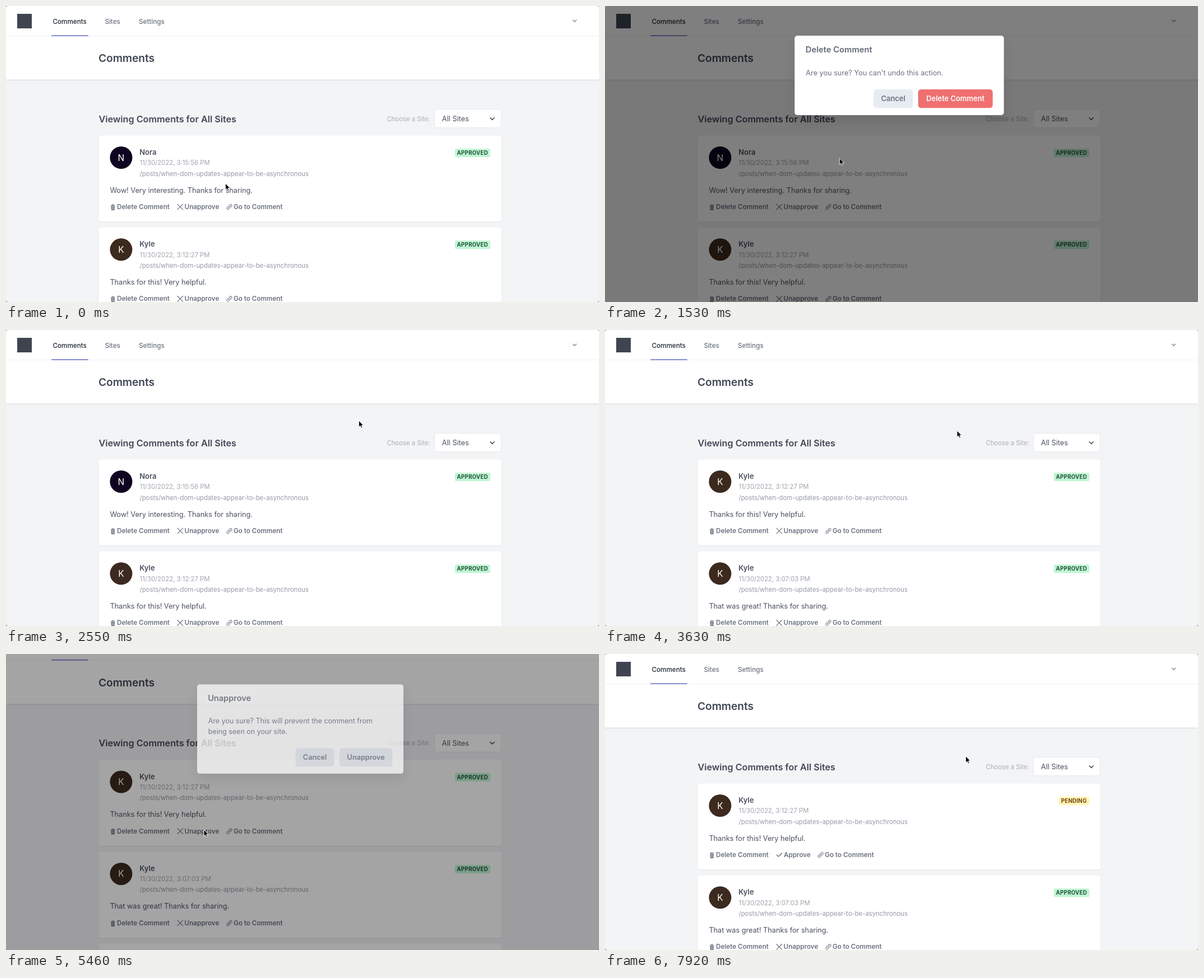
An HTML page for the animation above (8.1 s loop, 1058 by 529 pixels).

```html
<!DOCTYPE html>
<html lang="en">
<head>
<meta charset="utf-8">
<title>Comments</title>
<style>
  html, body { margin: 0; width: 100%; height: 100%; overflow: hidden; background: #777; }
  svg { display: block; width: 1058px; height: 529px; border-radius: 4px; font-family: Inter, "Open Sans", sans-serif; }
  .body { font-size: 12.8px; letter-spacing: -.004em; }
  .small { font-size: 11.33px; }
  .act { font-size: 11.67px; font-weight: 600; fill: #6b7280; }
  .badge { font-size: 9.7px; font-weight: 700; letter-spacing: .25px; }
  .btn { font-size: 12.9px; font-weight: 600; text-anchor: middle; }
  .line { fill: none; stroke: #6b7280; stroke-width: 1.2; stroke-linecap: round; stroke-linejoin: round; }
  .card { filter: drop-shadow(0 1px 1px rgba(0,0,0,.06)); }
  .panel { filter: drop-shadow(0 10px 10px rgba(0,0,0,.1)); }
</style>
</head>
<body>
<svg id="stage" viewBox="0 0 1058 529"></svg>
<script>
const LOOP = 8100, SCROLL = 42.4;
const PATH = '/posts/when-dom-updates-appear-to-be-asynchronous';

const text = (x, y, str, fill, attrs = '') => `<text x="${x}" y="${y}" fill="${fill}" ${attrs}>${str}</text>`;
const rect = (x, y, w, h, fill, attrs = '') => `<rect x="${x}" y="${y}" width="${w}" height="${h}" fill="${fill}" ${attrs}/>`;
const line = (d, attrs = '') => `<path class="line" d="${d}" ${attrs}/>`;

const trash = `<path fill="#6b7280" d="M187 124.2h2.2l.5-1.2h2l.5 1.2h2.3v1.2h-7.5zM187.4 126.2h6.7l-.5 7.3h-5.7z"/>
  <path stroke="#fff" stroke-width=".5" d="M189.4 127.5v4.7M190.8 127.5v4.7M192.2 127.5v4.7"/>`;
const link = x => `<g transform="translate(${x} 127.5) rotate(-45)">
  ${line('M-.8 -2H-3.6a2 2 0 0 0 0 4H-.8M.8 -2H3.6a2 2 0 0 1 0 4H.8M-2.2 0H2.2', 'style="stroke-width:1"')}</g>`;

function card(index, c) {
  const frame = rect(165.5, 0, 718.5, 153.5, '#fff', 'rx="4" class="card"');
  const open = `<g transform="translate(0 ${231.5 + index * 164.3})">${frame}`;
  if (!c) return open + '</g>';
  const badge = c.pending
    ? rect(809.5, 23.5, 54.5, 15, '#fef5b5', 'rx="2"') + text(813.8, 34.6, 'PENDING', '#744210', 'class="badge"')
    : rect(801, 23.5, 63, 15, '#c0f5d3', 'rx="2"') + text(804.6, 34.6, 'APPROVED', '#22543d', 'class="badge"');
  const toggle = c.pending
    ? line('M306.5 127.5l3 3 6 -6', 'style="stroke-width:1.5"') + text(319, 131.7, 'Approve', '', 'class="act"')
    : line('M306 122.7l9.6 9.6M315.6 122.7l-9.6 9.6') + text(318.6, 131.7, 'Unapprove', '', 'class="act"');
  const shift = c.pending ? -13.8 : 0;
  return open + badge + toggle + trash +
    `<circle cx="205.4" cy="39.5" r="20" fill="${c.color}"/>` +
    text(205.4, 45, c.name[0], '#fff', 'font-size="15.5" text-anchor="middle"') +
    text(238.2, 34.7, c.name, '#4a505d', 'font-size="13" font-weight="600"') +
    text(238.6, 52.8, `11/30/2022, ${c.time} PM`, '#a0a5af', 'class="small"') +
    text(238.6, 72, PATH, '#959aa5', 'class="small"') +
    text(185.4, 102, c.body, '#4b5260', 'class="body"') +
    text(198, 131.7, 'Delete Comment', '', 'class="act"') +
    link(398.5 + shift) + text(406 + shift, 131.7, 'Go to Comment', '', 'class="act"') + '</g>';
}

const first = { name: 'Nora', color: '#0f0520', time: '3:15:56', body: 'Wow! Very interesting. Thanks for sharing.' };
const second = { name: 'Kyle', color: '#3c2a1e', time: '3:12:27', body: 'Thanks for this! Very helpful.' };
const third = { name: 'Kyle', color: '#3c2a1e', time: '3:07:03', body: 'That was great! Thanks for sharing.' };
const lists = [[first, second], [second, third], [{ ...second, pending: true }, third]];

const header =
  rect(0, 0, 1058, 131.5, '#fff', 'style="filter:drop-shadow(0 1px 1px rgba(0,0,0,.12))"') +
  rect(0, 53, 1058, 1, '#f1f2f4') +
  rect(20, 14, 26, 26, '#3f4450') +
  rect(81, 52.2, 65.7, 1.8, '#7d82cf') +
  text(83.5, 31.8, 'Comments', '#1f2633', 'font-size="11.67" font-weight="500"') +
  text(176.4, 31.8, 'Sites', '#6b7280', 'font-size="11.67" font-weight="500"') +
  text(237, 31.8, 'Settings', '#6b7280', 'font-size="11.67" font-weight="500"') +
  line('M1011.6 25.2l3 3 3 -3') +
  text(165, 100, 'Comments', '#414856', 'font-size="19.2" font-weight="600" letter-spacing="-.005em"') +
  text(165.4, 207.5, 'Viewing Comments for All Sites', '#414856', 'font-size="16.2" font-weight="600"') +
  text(679.4, 205.7, 'Choose a Site:', '#a9aeb8', 'class="small"') +
  rect(764.5, 184.8, 118.8, 32.6, '#fff', 'rx="4" stroke="#e6e8ec"') +
  text(777.8, 206, 'All Sites', '#4b5260', 'font-size="12.8"') +
  line('M864 199.8l3.6 3.6 3.6 -3.6', 'style="stroke:#414856;stroke-width:1.5"');

function modal(id, title, lines, label, width, fill, ink) {
  const extra = (lines.length - 1) * 20, left = 691.7 - width, top = 149 + extra;
  const cancel = left - 79.5;
  return `<g id="${id}">` +
    rect(338.3, 53, 373.4, 142 + extra, '#fff', 'rx="5" class="panel"') +
    text(357.8, 83.2, title, '#626975', 'font-size="14.75" font-weight="600"') +
    lines.map((s, i) => text(358.3, 123.5 + i * 20, s, '#6b7280', 'class="body"')).join('') +
    rect(cancel, top, 70, 33.3, '#e7ecf3', 'rx="5"') +
    text(cancel + 35, top + 21.3, 'Cancel', '#6b7280', 'class="btn"') +
    rect(left, top, width, 33.3, fill, 'rx="5" class="ok"') +
    text(left + width / 2, top + 21.3, label, ink, 'class="btn"') + '</g>';
}

const stage = document.getElementById('stage');
stage.innerHTML = rect(0, 0, 1058, 529, '#f3f4f6') +
  '<g id="page">' + header +
  lists.map(list => `<g class="list">${[...list, null].map((c, i) => card(i, c)).join('')}</g>`).join('') +
  '</g>' +
  rect(0, 0, 1058, 529, '#000', 'id="shade"') +
  modal('remove', 'Delete Comment', ["Are you sure? You can't undo this action."], 'Delete Comment', 133, '#f07070', '#fff') +
  modal('hide', 'Unapprove', ['Are you sure? This will prevent the comment from', 'being seen on your site.'],
    'Unapprove', 95.7, '#e7ecf3', '#6b7280') +
  `<g id="cursor" stroke-linejoin="round">
    <path id="arrow" fill="#000" stroke="#fff" stroke-width=".9"
      d="M0 0V11.6L2.7 9.2L4.4 13.2L6.4 12.3L4.7 8.5H8.2Z"/>
    <path id="hand" fill="#fff" stroke="#000" stroke-width="1"
      d="M-1 1Q0 -.6 1 1V5Q2 4.2 3 5.2Q4.2 4.6 5 5.8Q6.6 5.4 6.8 7V9.5L5.6 13H0L-4 8.6Q-4.2 6.8 -2.4 7.4L-1 8.6Z"/>
  </g>`;

const $ = id => document.getElementById(id);
const show = (el, on) => el.style.display = on ? '' : 'none';
const ramp = (t, a, b) => Math.min(1, Math.max(0, (t - a) / (b - a)));
const smooth = p => p * p * (3 - 2 * p);
const within = (t, spans) => spans.some(([a, b]) => t >= a && t < b);

// start, end, x, y of each pointer move
const moves = [
  [75, 480, 249, 360], [1245, 1860, 629.5, 162], [3600, 3750, 615.5, 333.5],
  [4425, 5100, 353, 314], [5805, 6570, 643.5, 182.5]
];
const hands = [[400, 690], [1680, 2374], [5030, 5280], [6400, 7060]];

function pointer(t) {
  let x = 391.5, y = 317;
  for (const [a, b, toX, toY] of moves) {
    const p = smooth(ramp(t, a, b));
    x += (toX - x) * p;
    y += (toY - y) * p;
  }
  return [x, y];
}

function setModal(id, p, centerY) {
  const el = $(id), s = .95 + .05 * p;
  show(el, p > 0);
  el.setAttribute('opacity', p);
  el.setAttribute('transform', `translate(525 ${centerY}) scale(${s}) translate(-525 ${-centerY})`);
}

function draw(now) {
  const t = now % LOOP;
  const scroll = t < 7230 ? SCROLL * smooth(ramp(t, 3885, 4300)) : 0;
  $('page').setAttribute('transform', `translate(0 ${-scroll})`);

  const current = t < 2700 ? 0 : t < 7230 ? 1 : 2;
  document.querySelectorAll('.list').forEach((el, i) => show(el, i === current));

  const remove = ramp(t, 675, 975) - ramp(t, 2134, 2374);
  const hide = ramp(t, 5245, 5545) - ramp(t, 6825, 7060);
  setModal('remove', remove, 124.2);
  setModal('hide', hide, 134.2);
  $('shade').setAttribute('opacity', .5 * Math.max(remove, hide));
  document.querySelector('#remove .ok').setAttribute('fill', t > 1680 ? '#d96464' : '#f07070');

  const hand = within(t, hands);
  show($('hand'), hand);
  show($('arrow'), !hand);
  $('cursor').setAttribute('transform', `translate(${pointer(t)})`);
}

let start;
function tick(now) {
  start ??= now;
  draw(now - start);
  requestAnimationFrame(tick);
}
draw(0);
requestAnimationFrame(tick);
</script>
</body>
</html>
```
